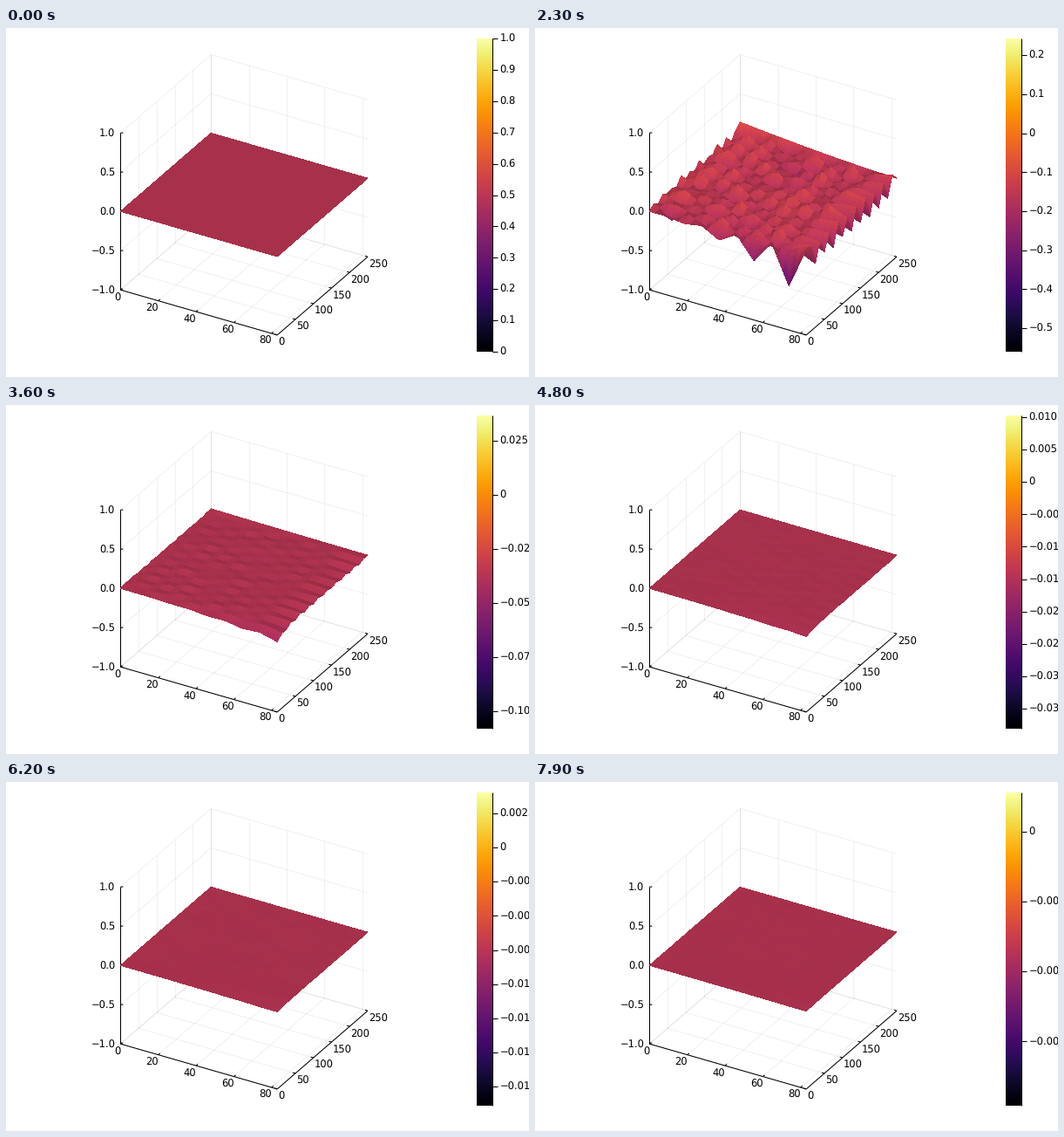
A matplotlib script that plays this animation: 600 px wide and 400 px high, repeating every 8 s.

```python
import math
import numpy as np
import matplotlib.pyplot as plt
from matplotlib.animation import FuncAnimation
from matplotlib.collections import LineCollection, PolyCollection

plt.rcParams["font.family"] = "DejaVu Sans"
plt.rcParams["text.hinting"] = "none"
FRAMES, INTERVAL = 80, 100
START = 0.9
X_MAX, Y_MAX = 83, 250
NX, NY = 10, 21          # coarse nodes of the faceted sheet
FINE_X, FINE_Y = 28, 121
FONT = 8.3
CMAP = plt.get_cmap("inferno")
BAR_L, BAR_R, BAR_T, BAR_B = 540, 558, 12, 371

fig = plt.figure(figsize=(6, 4), dpi=100, facecolor="white")
ax = fig.add_axes([0, 0, 1, 1])


def project(x, y, z):
    """Data coordinates to stage pixels."""
    u, v = x / X_MAX, y / Y_MAX
    return np.stack([131.4 + 179.8 * u + 103.8 * v,
                     210.2 + 51.7 * u - 89.7 * v - 90 * z], axis=-1)


def segment(a, b):
    return [project(*np.array(a, float)), project(*np.array(b, float))]


def label(x, y, text, ha):
    return ax.text(x, y, text, fontsize=FONT, ha=ha, va="center_baseline")


def number(value, digits):
    return f"{value:.{digits}f}".replace("-", "−")


# Box grid, axes and tick labels
grid = []
axes = [segment((0, 0, -1), (0, 0, 1)), segment((0, 0, -1), (X_MAX, 0, -1)),
        segment((X_MAX, 0, -1), (X_MAX, Y_MAX, -1))]
for x in range(0, 81, 20):
    grid += [segment((x, 0, -1), (x, Y_MAX, -1)), segment((x, Y_MAX, -1), (x, Y_MAX, 1))]
    axes.append(segment((x, 0, -1), (x, 5, -1)))
    px, py = project(x, 0, -1)
    label(px, py + 7.7, str(x), "right")
for y in range(0, 251, 50):
    grid += [segment((0, y, -1), (X_MAX, y, -1)), segment((0, y, -1), (0, y, 1))]
    axes.append(segment((X_MAX, y, -1), (X_MAX - 1.4, y, -1)))
    px, py = project(X_MAX, y, -1)
    label(px + 1.3, py + 7.7, str(y), "left")
for z in np.linspace(-1, 1, 5):
    grid += [segment((0, 0, z), (0, Y_MAX, z)), segment((0, Y_MAX, z), (X_MAX, Y_MAX, z))]
    axes.append(segment((0, 0, z), (1, 2, z)))
    px, py = project(0, 0, z)
    label(px - 6, py, number(z, 1), "right")
ax.add_collection(LineCollection(grid, colors="black", alpha=.1, linewidths=.4, zorder=1))
ax.add_collection(LineCollection(axes, colors="black", linewidths=.75, zorder=2))

# Colour bar
ax.imshow(np.linspace(1, 0, 256)[:, None], cmap=CMAP, aspect="auto",
          extent=(BAR_L, BAR_R, BAR_B, BAR_T), interpolation="nearest", zorder=1)
ax.set_xlim(0, 600)
ax.set_ylim(400, 0)
ax.axis("off")
bar_axis = LineCollection([], colors="black", linewidths=.75, zorder=3)
ax.add_collection(bar_axis)
bar_labels = [label(566.3, 0, "", "left") for _ in range(13)]

# Key points of the lowest and highest value, joined by exponential curves
KEY_TIMES = (1.5, 2.3, 3.6, 4.8, 6.2, 7.9)
LOG_LOW = np.log((.404, .56, .108, .0381, .0189, .0098))
LOG_HIGH = np.log((.261, .243, .0367, .01027, .00403, .0014))


def bounds(t):
    if t < START:
        return 0, 1
    return (-math.exp(np.interp(t, KEY_TIMES, LOG_LOW)),
            math.exp(np.interp(t, KEY_TIMES, LOG_HIGH)))


def tick_step(span):
    power = 10 ** math.floor(math.log10(span) - 1)
    return next(m * power for m in (.5, 1, 2.5, 5, 10) if span / (m * power) <= 10.01)


def update_bar(lo, hi):
    step = tick_step(hi - lo)
    digits = next(d for d in range(1, 7) if abs(round(step, d) - step) < step * 1e-6)
    lines = [[(BAR_R, BAR_T), (BAR_R, BAR_B)]]
    first = math.ceil(lo / step - 1e-6)
    for n, text in enumerate(bar_labels, first):
        value = n * step
        shown = value <= hi + step * 1e-6
        text.set_visible(shown)
        if shown:
            y = BAR_B - (value - lo) / (hi - lo) * (BAR_B - BAR_T)
            lines.append([(BAR_R, y), (BAR_R + 6, y)])
            text.set_y(y - .5)
            text.set_text(number(value, digits) if n else "0")
    bar_axis.set_segments(lines)


rng = np.random.default_rng(7)
phase = rng.uniform(0, 2 * math.pi, (NX, NY))
speed = rng.uniform(1, 4, (NX, NY))
k, j = np.arange(NX), np.arange(NY)
reach = k / (NX - 1)
k_sign, j_sign = (-1.0) ** k, (-1.0) ** j


def front_edge(t, lo):
    """Zigzag that grows along x, swings over time and settles into a slope."""
    s = t - KEY_TIMES[0]
    mean = np.clip(.2 + .27 * s, .2, .95)
    swing = -.8 * math.cos(math.pi * s / .9) * math.exp(-max(s, 0) / 3)
    return lo * reach ** 2 * (mean + swing * k_sign)


def nodes(t):
    """Coarse heights: pyramids in a checkerboard, teeth along the right edge."""
    if t < START:
        return np.zeros((NX, NY))
    lo, hi = bounds(t)
    ripple = .14 * min(1, -lo / .4) ** 1.6
    size = .55 + .45 * np.cos(phase + speed * t)
    z = ripple * (.12 - .85 * size * k_sign[:, None] * j_sign)
    z[0] = ripple * (.25 - .5 * j_sign * size[0])
    z[-1] = -ripple * (.35 + j_sign * (.6 + .4 * size[-1]))
    z[:, -1] = ripple * (1 - reach) ** 1.5
    front = front_edge(t, lo)
    settled = np.clip((t - 2.3) / 1.3, 0, 1)
    z += settled * front[:, None] * .5 ** j
    z[:, 0] = front
    return np.clip(z, lo, hi)


def hat_weights(count, samples):
    s = np.linspace(0, count - 1, samples)[:, None]
    return np.maximum(0, 1 - np.abs(s - np.arange(count)))


WX, WY = hat_weights(NX, FINE_X), hat_weights(NY, FINE_Y)
GX, GY = np.meshgrid(np.linspace(0, X_MAX, FINE_X), np.linspace(0, Y_MAX, FINE_Y),
                     indexing="ij")
LIGHT = np.array([.2, -.75, .63])


def corners(grid):
    return np.stack([grid[:-1, :-1], grid[1:, :-1], grid[1:, 1:], grid[:-1, 1:]], axis=2)


def far_to_near(cells):
    """Order cells from the back row forward, left to right in each row."""
    cells = cells[:, ::-1].swapaxes(0, 1)
    return cells.reshape(-1, *cells.shape[2:])


def sheet(t):
    z = WX @ nodes(t) @ WY.T
    zx = np.diff(z, axis=0) * (FINE_X - 1) / 2
    zy = np.diff(z, axis=1) * (FINE_Y - 1) / 2
    zx = (zx[:, 1:] + zx[:, :-1]) / 2
    zy = (zy[1:] + zy[:-1]) / 2
    normal = np.stack([-zx, -zy, np.ones_like(zx)], axis=-1)
    normal /= np.linalg.norm(normal, axis=-1, keepdims=True)
    shade = np.clip(.89 + .45 * (normal @ LIGHT - LIGHT[2]), .83, 1.1)
    colors = CMAP((corners(z).mean(axis=2) + 1) / 2)
    colors[..., :3] = np.clip(colors[..., :3] * shade[..., None], 0, 1)
    return far_to_near(corners(project(GX, GY, z))), far_to_near(colors)


surface = PolyCollection([], edgecolors="none", linewidths=0, antialiaseds=False, zorder=4)
ax.add_collection(surface)


def update(n):
    t = n * INTERVAL / 1000
    quads, colors = sheet(t)
    surface.set_verts(quads)
    surface.set_facecolor(colors)
    update_bar(*bounds(t))
    return [surface, bar_axis, *bar_labels]


anim = FuncAnimation(fig, update, frames=FRAMES, interval=INTERVAL,
                     repeat=True, repeat_delay=0, blit=False)
plt.show()
```
